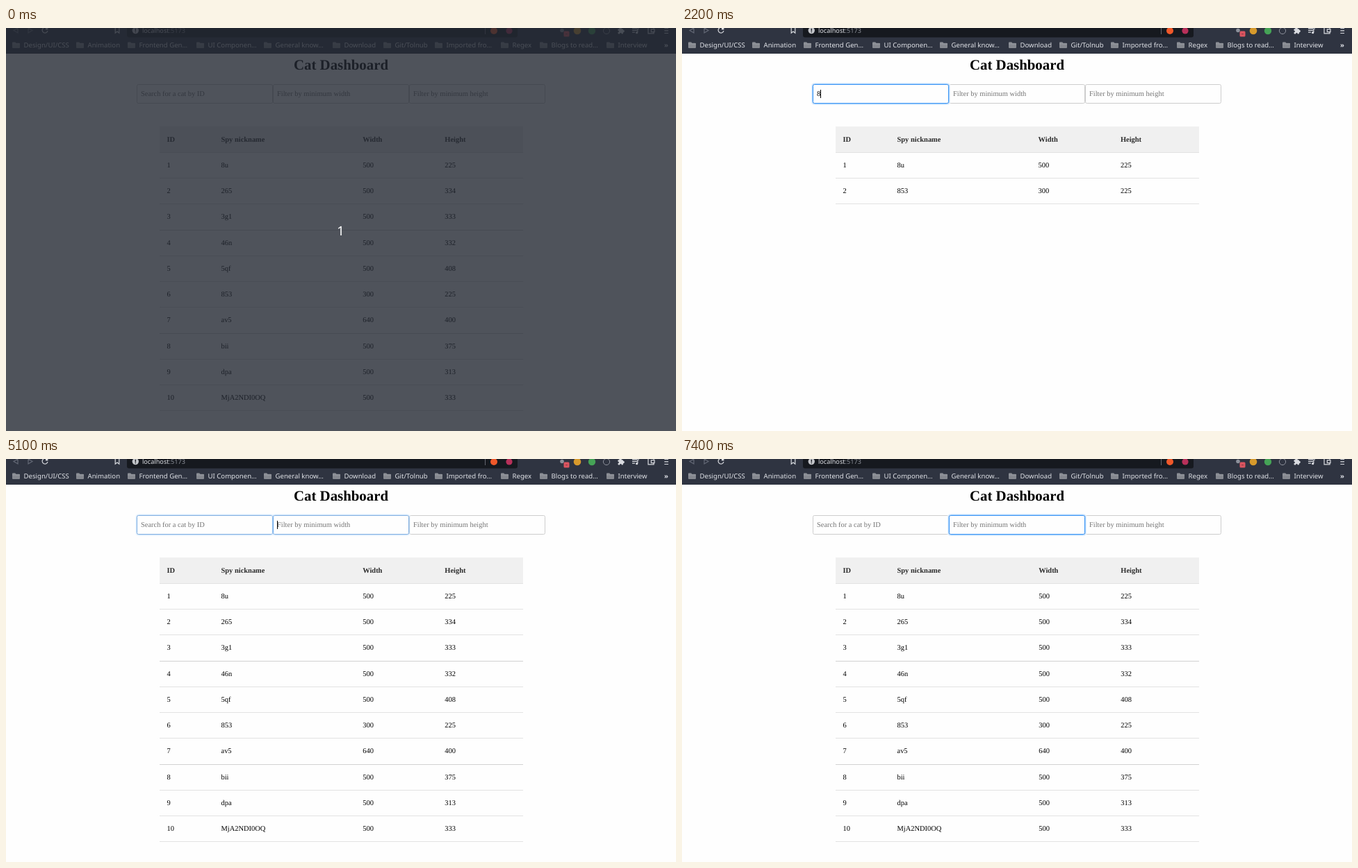
An HTML page for the animation above (8000 ms loop, 964x581 px).

```html
<!DOCTYPE html>
<html lang="en">
<head>
<meta charset="utf-8">
<title>Cat Dashboard</title>
<style>
  html, body { margin: 0; width: 100%; height: 100%; overflow: hidden; background: #fefefe; }
  svg { display: block; width: 964px; height: 581px; }
  text { white-space: pre; text-rendering: geometricPrecision; }
  .serif { font: 10.45px "Liberation Serif", "Times New Roman", serif; }
  .sans { font: 9.6px "Noto Sans", "Open Sans", sans-serif; fill: #e1e3e8; }
  .bold { font-weight: bold; }
</style>
</head>
<body>
<svg viewBox="0 0 964 581">
  <rect width="964" height="581" fill="#fefefe"/>
  <g id="chrome"></g>
  <text class="serif bold" style="font-size:20.85px" x="482" y="60" text-anchor="middle">Cat Dashboard</text>
  <g id="inputs" class="serif"></g>
  <g id="table" class="serif"></g>
  <g id="cover">
    <rect width="964" height="581" fill="rgb(36,40,50)" opacity=".8"/>
    <text class="sans" style="font-size:18.5px;fill:#fff" x="481.5" y="299" text-anchor="middle">1</text>
  </g>
</svg>
<script>
const LOOP = 8000;
const $ = id => document.getElementById(id);

const rect = (x, y, w, h, fill, extra = '') =>
  `<rect x="${x}" y="${y}" width="${w}" height="${h}" fill="${fill}" ${extra}/>`;
const text = (x, y, s, extra = '') => `<text x="${x}" y="${y}" ${extra}>${s}</text>`;
const dot = (x, y, r, fill) => `<circle cx="${x}" cy="${y}" r="${r}" fill="${fill}"/>`;
const path = (d, stroke, extra = '') =>
  `<path d="${d}" fill="none" stroke="${stroke}" stroke-width="1.2" ${extra}/>`;

// Browser bars
const bookmarks = [
  [9, 'Design/UI/CSS'], [101, 'Animation'], [175, 'Frontend Gen…'], [274, 'UI Componen…'],
  [371, 'General know…'], [470, 'Download'], [543, 'Git/Tolnub'], [617, 'Imported fro…'],
  [712, 'Regex'], [768, 'Blogs to read…'], [864, 'Interview']
];

const folder = x =>
  `<path d="M${x} 21.2q0-1 1-1h3.2l1.3 1.5h4.5q1 0 1 1v5.3q0 1-1 1h-9q-1 0-1-1z" fill="#85888f"/>` +
  rect(x, 22.6, 11, .7, '#a3a6ac');

function drawChrome() {
  const light = '#d9dbe0', dim = '#646976';
  $('chrome').innerHTML =
    rect(0, 0, 964, 37, '#2f3441') +
    rect(174, -8, 562, 21.5, '#16191f', 'rx="3"') +
    path('M17 0.5V7L11 3.5L17 0M32 0.5V7L38 3.5L32 0', dim, 'stroke-width="1"') +
    path('M59 .3A4 4 0 1 0 60 4.2', light, 'stroke-width="1.5"') +
    rect(57, 0, 3.4, 2.4, light) +
    path('M157.2 0V7.2L160 5L162.8 7.2V0', light) +
    dot(186.3, 3.6, 4.7, '#c3c5ca') + rect(185.7, .8, 1.3, 3.6, '#16191f') + rect(185.7, 5.2, 1.3, 1.2, '#16191f') +
    text(196, 7, 'localhost<tspan fill="#8b8f98">:5173</tspan>', 'class="sans" style="font-size:9.15px"') +
    rect(689, 0, 1, 9, '#62666f') +
    dot(702, 4, 5, '#f0582a') + dot(724, 4, 4.6, '#b8305a') +
    dot(800, 3.5, 2.8, '#8d919b') + rect(802.5, 4.5, 8, 8, '#dc5560', 'rx="1.5"') + rect(805, 8.2, 3, 1, '#843a42') +
    dot(822, 4, 5.3, '#d79a2c') + dot(843, 4, 5.2, '#45a356') +
    `<circle cx="864" cy="4" r="4.6" fill="none" stroke="#8d919b"/>` +
    rect(880.5, 1.2, 7.4, 7.2, light, 'rx="1"') + dot(884, .8, 1.8, light) + dot(888, 4.6, 1.8, light) +
    dot(880.6, 5, 1.3, '#2f3441') + dot(884.4, 8.3, 1.3, '#2f3441') +
    path('M901 .7H908M901 3.4H908M901 6.1H905M911 1H908.8V6.5', light) + dot(907.6, 6.7, 1.6, light) +
    path('M932 1V-.5H924V7.8H932V6.2M928.3 1.8H933V5.6H928.3Z', light) +
    path('M947.3 .3H953M947.3 3.9H953M947.3 7.5H953', light) +
    bookmarks.map(([x, s]) => folder(x) + text(x + 16.5, 28, s, 'class="sans"')).join('') +
    text(947, 27.6, '»', 'class="sans bold"');
}

// Search fields
const hints = ['Search for a cat by ID', 'Filter by minimum width', 'Filter by minimum height'];
const fieldX = i => 188 + 196 * i;

const frame = (x, grow, color) =>
  rect(x + .5 - grow, 81.5 - grow, 195 + 2 * grow, 27 + 2 * grow, 'none',
    `rx="${2 + grow}" stroke="${color}"`);

function drawInputs({ glow, caret, query }) {
  const x = hints.map((_, i) => fieldX(i));
  const rings = x.map((x, i) => `<g opacity="${glow[i]}">` +
    frame(x, 2, '#fefefe') + frame(x, 2, '#e0effe') + frame(x, 1, '#b0d6fc') + frame(x, 0, '#3793f5') + '</g>');
  $('inputs').innerHTML =
    x.map(x => frame(x, 0, '#cdcdcd')).join('') + rings.join('') +
    hints.map((s, i) => i === 0 && query
      ? text(x[i] + 6, 98, query)
      : text(x[i] + 6, 98, s, 'fill="#757575"')).join('') +
    (caret ? rect(caret, 89, 1, 12, '#000') : '');
}

// Results
const cats = [
  ['8u', 500, 225], ['265', 500, 334], ['3g1', 500, 333], ['46n', 500, 332], ['5qf', 500, 408],
  ['853', 300, 225], ['av5', 640, 400], ['bii', 500, 375], ['dpa', 500, 313], ['MjA2NDI0OQ', 500, 333]
];
const lineY = k => Math.round(179 + 37.23 * k);

function drawTable(query) {
  const found = cats.filter(cat => cat[0].includes(query));
  const shift = query ? .7 : 0;
  const cols = [231.5, 309.5, 513.2 - shift, 631.3 - shift / 2];
  const cells = (list, y, extra) => list.map((s, i) => text(cols[i], y, s, extra)).join('');
  const line = k => rect(221, lineY(k), 523, 1, k % 4 === 3 ? '#d2d2d2' : '#e2e2e2');
  $('table').innerHTML =
    rect(221, 142, 523, 37, '#f0f0f0') +
    cells(['ID', 'Spy nickname', 'Width', 'Height'], 164, 'class="bold" fill="#2b2b2b"') + line(0) +
    found.map((cat, k) => cells([k + 1, ...cat], lineY(k) + 22) + line(k + 1)).join('');
}

// Each step lists only what changes at its time.
const C1 = 194, C2 = 390, C3 = 586;
const steps = [
  [0, { cover: true, glow: [0, 0, 0], caret: 0, query: '' }],
  [100, { cover: false }],
  [500, { caret: C1, glow: [.5, 0, 0] }],
  [600, { glow: [1, 0, 0] }],
  [1100, { caret: 0 }],
  [1600, { caret: C1 }],
  [2200, { query: '8', caret: C1 + 5 }],
  [2400, { query: '8u', caret: C1 + 10 }],
  [3000, { caret: 0 }],
  [3100, { query: '8' }],
  [3300, { query: '' }],
  [3600, { caret: C1 }],
  [4200, { caret: 0 }],
  [4700, { caret: C1 }],
  [5000, { caret: C2 }],
  [5100, { glow: [.5, .5, 0] }],
  [5200, { glow: [0, 1, 0] }],
  [5600, { caret: 0 }],
  [6100, { caret: C3 }],
  [6200, { glow: [0, .5, .5] }],
  [6300, { glow: [0, 0, 1] }],
  [6700, { caret: 0 }],
  [6800, { caret: C2 }],
  [6900, { glow: [0, .5, .5] }],
  [7000, { glow: [0, 1, 0] }],
  [7400, { caret: 0 }]
];

const start = performance.now();
let shown = 0;

function tick() {
  const t = (performance.now() - start) % LOOP;
  const past = steps.filter(step => step[0] <= t);
  if (past.length !== shown) {
    shown = past.length;
    const state = Object.assign({}, ...past.map(step => step[1]));
    $('cover').style.display = state.cover ? '' : 'none';
    drawInputs(state);
    drawTable(state.query);
  }
  requestAnimationFrame(tick);
}

drawChrome();
tick();
</script>
</body>
</html>
```
